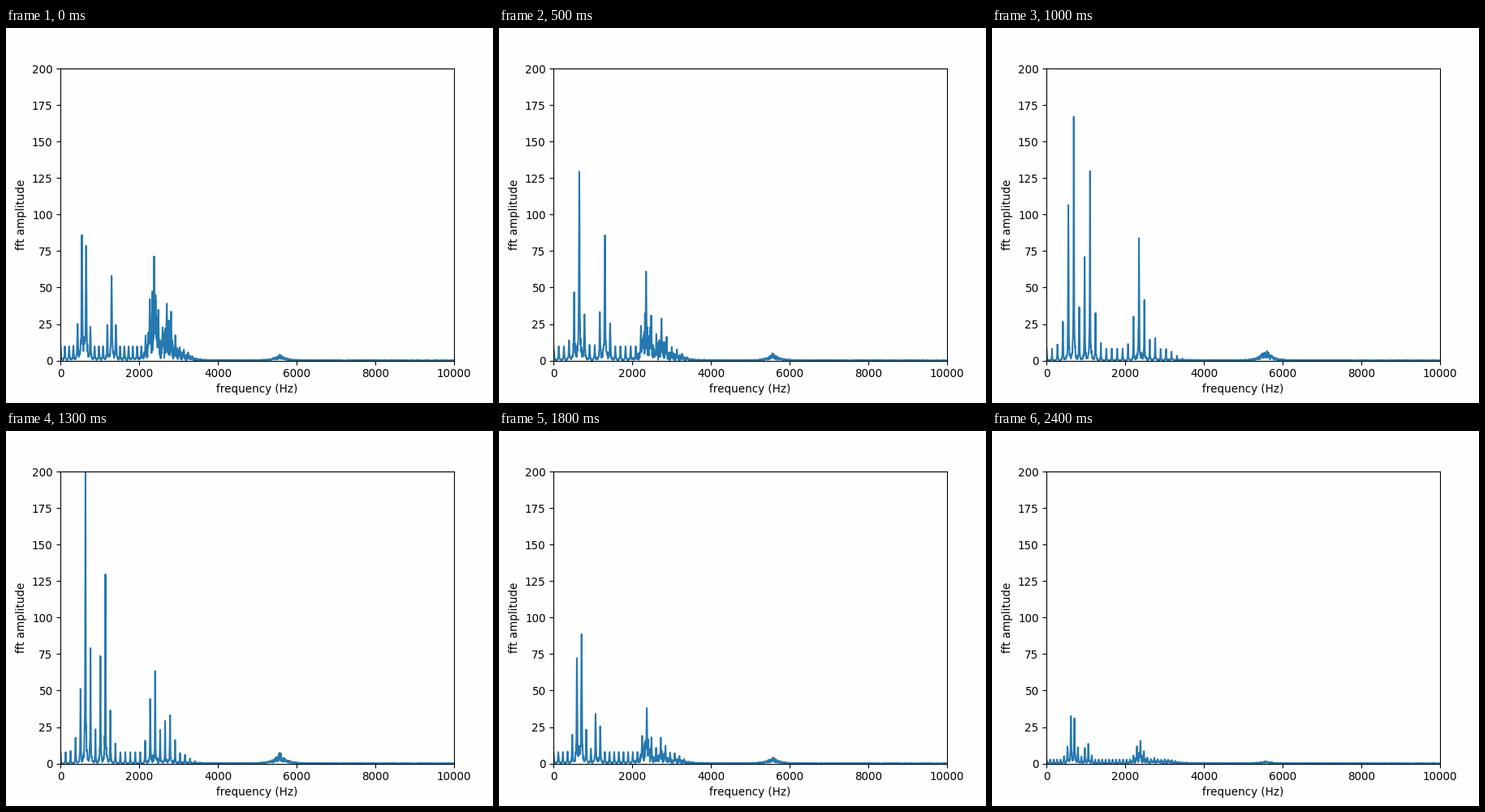
These frames come from a looping animation (600x463 px, 2500 ms). A matplotlib script:

```python
import numpy as np
import matplotlib.pyplot as plt
from matplotlib.animation import FuncAnimation
from matplotlib.lines import Line2D

W, H, DPI = 600, 463, 100
FRAMES, INTERVAL = 25, 100
PAPER = "#fefefe"
FREQ = np.arange(0, 10001, 5.4)

plt.rcParams.update({"font.family": "DejaVu Sans", "font.size": 9.76})

# time, pitch, breath, first formant (Hz, height), second (Hz, height),
# heights of the third and fourth
VOICE = np.array([
    (0, 108.0, 0.75, 590, 118, 1296, 58, 72, 41),
    (3, 117.2, 0.55, 610, 64, 1345, 60, 54, 34),
    (7, 143.9, 0.65, 660, 207, 1240, 115, 70, 24),
    (10, 138.0, 0.08, 640, 229, 1065, 153, 86, 16),
    (15, 118.8, 0.10, 660, 203, 1130, 144, 60, 50),
    (18, 118.4, 0.50, 660, 122, 1110, 42, 38, 18),
    (20, 115.0, 0.25, 660, 205, 1110, 100, 50, 30),
    (24, 88.3, 0.55, 660, 41, 1030, 15, 16, 4),
])


def bell(f, center, height, width):
    return height / (1 + ((f - center) / width) ** 2)


def sigmoid(x):
    return 1 / (1 + np.exp(-x))


def spectrum(i):
    pitch, breath, f1, a1, f2, a2, a3, a4 = (
        np.interp(i, VOICE[:, 0], col) for col in VOICE.T[1:])

    def envelope(f):
        formants = [bell(f, f1, a1, 82), bell(f, f2, a2, 92),
                    bell(f, 2365, a3, 115), bell(f, 2735, a4, 160)]
        base = np.full_like(f, a1 * (0.03 + 0.07 * breath))
        return np.maximum.reduce(formants + [base]) * sigmoid((3250 - f) / 100)

    tones = pitch * np.arange(45)
    f = np.union1d(FREQ, tones)
    grain, rough = np.random.default_rng(100 + i).random((2, f.size))

    # harmonics blur as the voice gets breathier
    dist = np.abs(f[:, None] - tones)
    blur = 7 + 7 * breath
    peaks = (envelope(tones) / (1 + (dist / blur) ** 1.8)).max(axis=1)
    peaks *= np.where(dist.min(axis=1) < blur, 1, 0.4 + 0.6 * rough)

    hiss = envelope(f) * breath * grain * (0.2 + 0.8 * sigmoid((f - 2100) / 50))
    far = 0.9 * np.exp(-f / 7000) * grain
    far += 0.037 * a1 * np.exp(-np.abs(f - 5570) / 150) * (0.2 + 0.8 * rough)
    return f, np.maximum(peaks, hiss) + far * (f > 3000)


fig = plt.figure(figsize=(W / DPI, H / DPI), dpi=DPI, facecolor=PAPER)
ax = fig.add_axes([67.3 / W, 52.4 / H, 484.7 / W, 360.6 / H], facecolor=PAPER)
ax.set(xlim=(0, 10000), ylim=(0, 200))
ax.set_xlabel("frequency (Hz)", labelpad=3.2)
ax.set_ylabel("fft amplitude")
ax.set_xticks(range(0, 10001, 2000))
ax.set_yticks(range(0, 201, 25))
fig.add_artist(Line2D([0, 1], [0.5 / H] * 2, color="#e6e6e6", lw=0.72))
line, = ax.plot([], [], color="#2678b0", lw=1.46)


def update(i):
    line.set_data(*spectrum(i))
    return line,


anim = FuncAnimation(fig, update, frames=FRAMES, interval=INTERVAL,
                     repeat=True, repeat_delay=0, blit=False)
plt.show()
```
